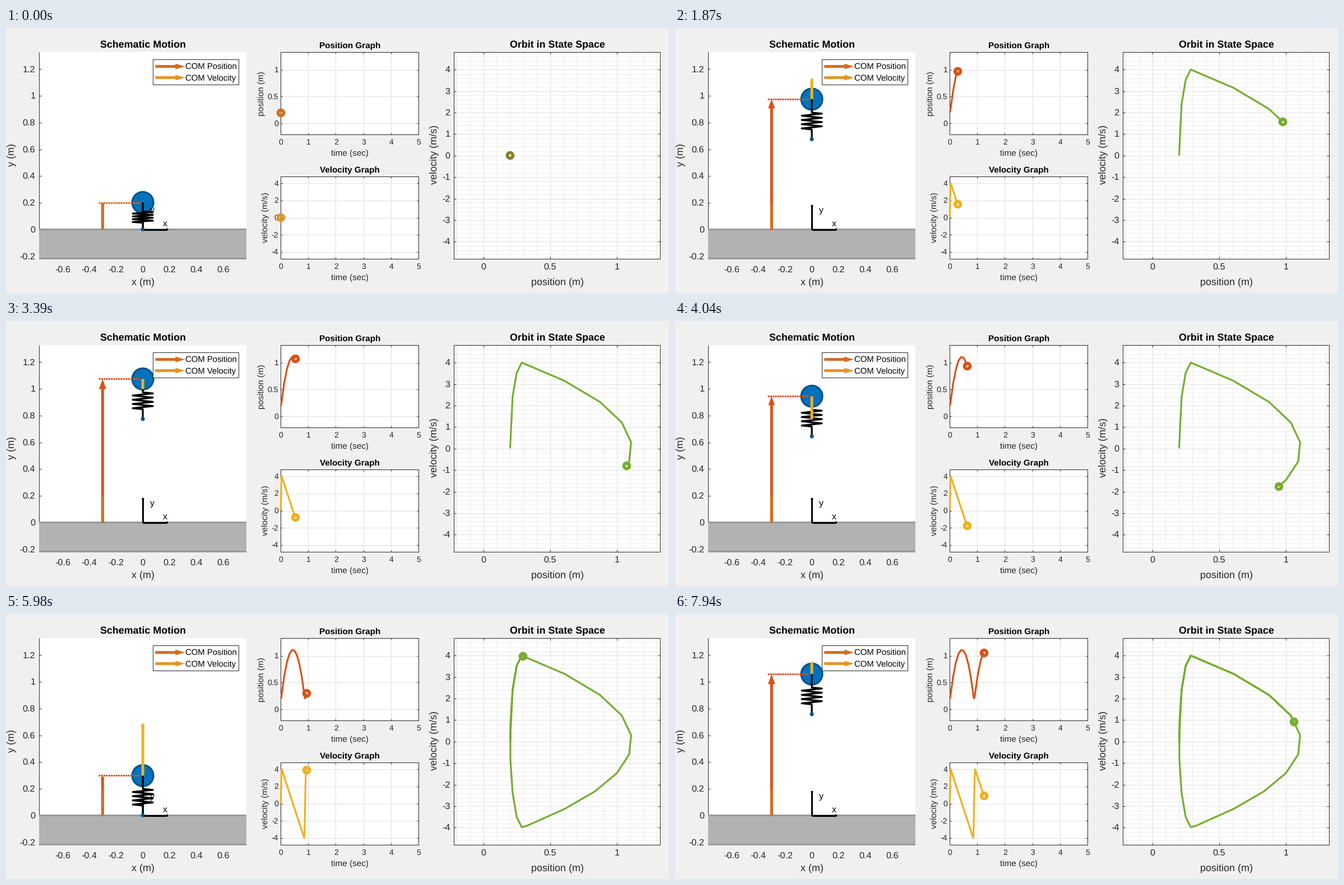
These frames come from a looping animation (1183 px wide and 473 px high, 8000 ms). A matplotlib script:

```python
import numpy as np
import matplotlib.pyplot as plt
from matplotlib.animation import FuncAnimation
from matplotlib.collections import LineCollection
from matplotlib.patches import Circle, Polygon, Rectangle

W, H, DPI = 1183, 473, 100
PT = 72 / DPI
INTERVAL, LOOP = 40, 8000
STEP_MS, STEP_SEC = 64.2, 0.01
plt.rcParams["font.family"] = "Liberation Sans"
plt.rcParams["text.hinting"] = "none"

INK, GRID, MINOR = "#262626", "#dfdfdf", "#c9c9c9"
ORANGE, YELLOW, GREEN = "#d95319", "#edb120", "#77ac30"
ORANGE_DULL, YELLOW_DULL, OLIVE = "#d86b1d", "#e69424", "#82822f"
BLUE, NAVY = "#0072bd", "#005084"

# One pixel-space axes; the small offset makes thin lines snap to their pixel.
fig = plt.figure(figsize=(W / DPI, H / DPI), dpi=DPI, facecolor="#f0f0f0")
ax = fig.add_axes([0, 0, 1, 1])
ax.set_xlim(-0.3, W - 0.3)
ax.set_ylim(H - 0.6, -0.6)
ax.axis("off")


# ---- motion: a spring-loaded hopper, sampled coarsely by its solver --------
G, PEAK, REST = 9.81, 1.11, 0.3
LOW, TRAVEL, SPEED, SWING, HALF_STANCE = 0.2, 0.094, 4.0, 1.5, 0.035
APEXES = (0.44, 1.325)
PHASES = np.arange(-7, 8, 2) / 7


def stance(bottom, phase):
    """Harmonic push on the ground: rows of time, position, velocity."""
    angle = SWING * phase
    return np.array([bottom + HALF_STANCE * phase,
                     LOW + TRAVEL * (1 - np.cos(angle)),
                     SPEED * np.sin(angle)])


def flight(apex):
    """Free fall around the apex, with samples slowly getting closer."""
    k = np.arange(9)
    v = 3.14 - 0.994 * k + 0.014 * k ** 2
    return np.array([apex - v / G, PEAK - v ** 2 / (2 * G), v])


KNOTS = np.hstack([stance(0, np.r_[0, PHASES[5:]]), flight(APEXES[0]),
                   stance(np.mean(APEXES), PHASES), flight(APEXES[1])])


def history(t):
    """Times, positions and velocities of all knots passed, ending at t."""
    times, pos, vel = KNOTS
    now = [t, np.interp(t, times, pos), np.interp(t, times, vel)]
    return np.column_stack([KNOTS[:, times < t], now])


# ---- drawing helpers ---------------------------------------------------------
def scale(origin, unit):
    return lambda value: origin + unit * np.asarray(value, float)


def text(x, y, s, size, ha="center", color=INK, z=3, **kw):
    ax.text(x, y - 0.9, s, fontsize=size * PT, ha=ha, va="baseline",
            color=color, zorder=z, **kw)


def title(x, y, s, size):
    text(x, y, s, size, color="black", weight="bold")


def upright(x, y, s, size):
    text(x, y, s, size, rotation=90, rotation_mode="anchor")


def segments(lines, color, width=1, z=2, style="solid"):
    ax.add_collection(LineCollection(lines, colors=color, zorder=z,
                                     linewidths=width * PT, linestyles=style))


def cross_lines(xs, ys, x0, y0, x1, y1, color, **kw):
    segments([[(x, y0), (x, y1)] for x in xs]
             + [[(x0, y), (x1, y)] for y in ys], color, **kw)


def line(color, width, z, **kw):
    return ax.plot([], [], color=color, lw=width * PT, zorder=z,
                   solid_joinstyle="round", **kw)[0]


def shape(patch, face, z, edge="none", width=1):
    patch.set(facecolor=face, edgecolor=edge, linewidth=width * PT, zorder=z)
    return ax.add_patch(patch)


def box(x0, y0, x1, y1, face, edge="none", z=1):
    shape(Rectangle((x0, y0), x1 - x0, y1 - y0), face, z, edge)


def arrow(x, y, dx, dy, head, half):
    """Outline of an arrow with a 5 px shaft, along one pixel vector."""
    full = np.hypot(dx, dy)
    ux, uy = dx / max(full, 1e-9), dy / max(full, 1e-9)
    along = np.array([0, full - head, full - head, full])
    side = np.array([2.5, 2.5, half, 0])
    along, side = np.r_[along, along[::-1]], np.r_[side, -side[::-1]]
    return np.column_stack([x + along * ux - side * uy,
                            y + along * uy + side * ux])


def up_arrow(x, y, metres):
    """Vertical arrow whose head grows with its length."""
    size = abs(metres)
    return arrow(x, y, 0, -238.5 * metres, 17 * size, 2.5 + 3.75 * size)


def panel(x0, y0, x1, y1, sx, sy, xticks, yticks, size, tick, gap):
    """Boxed plot with grid, inward ticks and tick labels."""
    box(x0, y0, x1, y1, "white")
    gx, gy = np.round(sx(xticks)), np.round(sy(yticks))
    cross_lines(gx, gy, x0, y0, x1, y1, GRID, z=1.3)
    cross_lines(gx, gy, x0, y0, x0 + tick, y0 + tick, INK)
    cross_lines(gx, gy, x1, y1, x1 - tick, y1 - tick, INK)
    box(x0, y0, x1, y1, "none", INK, z=2)
    for v, x in zip(xticks, sx(xticks)):
        text(x, y1 + 14 + size * 0.4, f"{v:g}", size)
    for v, y in zip(yticks, sy(yticks)):
        text(x0 - gap, y + 0.5 + size * 0.36, f"{v:g}", size, "right")


# ---- schematic panel ---------------------------------------------------------
X, Y = scale(243.8, 238.5), scale(358.6, -238.5)
CENTER, GROUND = 243.8, 359
BIG, SMALL, LABEL, SMALL_LABEL = 16.3, 14, 18, 15.3

box(59, 42, 429, 412, "white")
segments([[(59, 42), (59, 411)]], INK)
for n in range(-1, 7):
    y = float(Y(n / 5))
    segments([[(59, round(y)), (63, round(y))]], INK)
    text(52, y + 6.4, f"{n / 5:g}", BIG, "right")
for n in range(-3, 4):
    text(X(n / 5), 436, f"{n / 5:g}", BIG)
title(244.5, 35, "Schematic Motion", 17.9)
text(244.5, 459, "x (m)", LABEL)
upright(14, 226.5, "y (m)", LABEL)

box(59, GROUND, 429, 411, "#b2b2b2", z=2.2)
for y in (GROUND, 411):
    box(59, y - 1.6, 429, y + 1.4, "#999999", z=2.3)
for tip, name, at in (((287, GROUND), "x", (284, 354)),
                      ((244, 317), "y", (260.5, 330))):
    segments([[(244, GROUND), tip]], "black", 3, 4)
    shape(Circle(tip, 2), "black", 4)
    text(*at, name, 16, color="black", z=4)

box(262, 55, 415, 100, "white", INK, z=9)
for y, name, color in ((68, "COM Position", ORANGE_DULL),
                       (88, "COM Velocity", YELLOW_DULL)):
    shape(Polygon(arrow(266, y, 53, 0, 17, 5)), color, 9.5)
    text(319.5, y + 6, name, 14.9, "left", "black", z=9.5)

# ---- graph panels --------------------------------------------------------------
T = scale(490, 49.2)
P, V = scale(169.2, -95.5), scale(337.7, -15.3)
OX, OY = scale(851.5, 238.4), scale(226.8, -38.4)
small = dict(size=SMALL, tick=3, gap=4)
panel(490, 42, 736, 189, T, P, range(6), (0, 0.5, 1), **small)
panel(490, 264, 736, 411, T, V, range(6), range(-4, 5, 2), **small)
panel(799, 42, 1167, 411, OX, OY, (0, 0.5, 1), range(-4, 5), BIG, 4, 7)
cross_lines(np.round(OX([i / 10 for i in range(-2, 14) if i % 5])),
            np.round(OY([i / 5 for i in range(-23, 24) if i % 5])),
            799, 42, 1167, 411, MINOR, z=1.2, style=(0, (1, 2)))

title(613, 36, "Position Graph", SMALL_LABEL)
title(613, 258, "Velocity Graph", SMALL_LABEL)
title(983.5, 35, "Orbit in State Space", 17.9)
for y in (228, 450):
    text(613.5, y, "time (sec)", SMALL_LABEL)
text(984, 459, "position (m)", LABEL)
upright(460, 117.5, "position (m)", SMALL_LABEL)
upright(467, 338.5, "velocity (m/s)", SMALL_LABEL)
upright(768, 226.5, "velocity (m/s)", LABEL)

# ---- moving parts ----------------------------------------------------------------
ball = shape(Circle((0, 0), 19), BLUE, 3.5, NAVY, 3)
foot = shape(Circle((0, 0), 3.5), NAVY, 5.5)
level = line(ORANGE, 3, 4.5, dash_capstyle="butt")
level.set_dashes((1.05, 0.4))
spring = line("black", 3.2, 5, solid_capstyle="butt")
pos_arrow = shape(Polygon(up_arrow(172, GROUND, 1)), ORANGE, 5)
vel_arrow = shape(Polygon(up_arrow(172, GROUND, 1)), YELLOW, 6)
segments([[(172, 311), (172, GROUND)]], ORANGE_DULL, 5, 5.1)

COLORS = [(ORANGE, ORANGE_DULL), (YELLOW, YELLOW_DULL), (GREEN, OLIVE)]
trails = [line(c, 3.2, 6, solid_capstyle="butt") for c, _ in COLORS]
rings = [line(c, 1, 7, marker="o", mfc="none", ms=10 * PT, mew=5.6 * PT)
         for c, _ in COLORS]

# Spring outline: four coils between two straight ends, as fractions of length.
TURNS = 8
coil_x = CENTER + np.r_[0, 0, 18 * (-1) ** np.arange(TURNS), 0, 0]
coil_u = np.r_[0, 0.335, np.linspace(0.36, 0.73, TURNS), 0.755, 1]


def update(i):
    step = int(i * INTERVAL / STEP_MS)
    started = step > 0
    t, pos, vel = history(step * STEP_SEC)
    height, speed = pos[-1], vel[-1]
    com, base = Y(height), Y(max(height - REST, 0))

    ball.center = (CENTER, com)
    foot.center = (CENTER, base)
    spring.set_data(coil_x, com + (base - com) * coil_u)
    level.set_data([165, 237.5], [com, com])
    pos_arrow.set_xy(up_arrow(172, Y(0), height))
    vel_arrow.set_xy(up_arrow(CENTER, com, speed / 10))
    vel_arrow.set_visible(started)
    for part in (level, pos_arrow):
        part.set_color(ORANGE if started else ORANGE_DULL)
    pos_arrow.set_edgecolor("none")

    curves = [(T(t), P(pos)), (T(t), V(vel)), (OX(pos), OY(vel))]
    for (x, y), trail, ring, (bright, dull) in zip(curves, trails, rings,
                                                   COLORS):
        trail.set_data(x, y)
        ring.set_data(x[-1:], y[-1:])
        ring.set_markeredgecolor(bright if started else dull)
    return []


anim = FuncAnimation(fig, update, frames=LOOP // INTERVAL, interval=INTERVAL,
                     init_func=lambda: update(0), repeat=True, repeat_delay=0,
                     blit=False)
plt.show()
```
